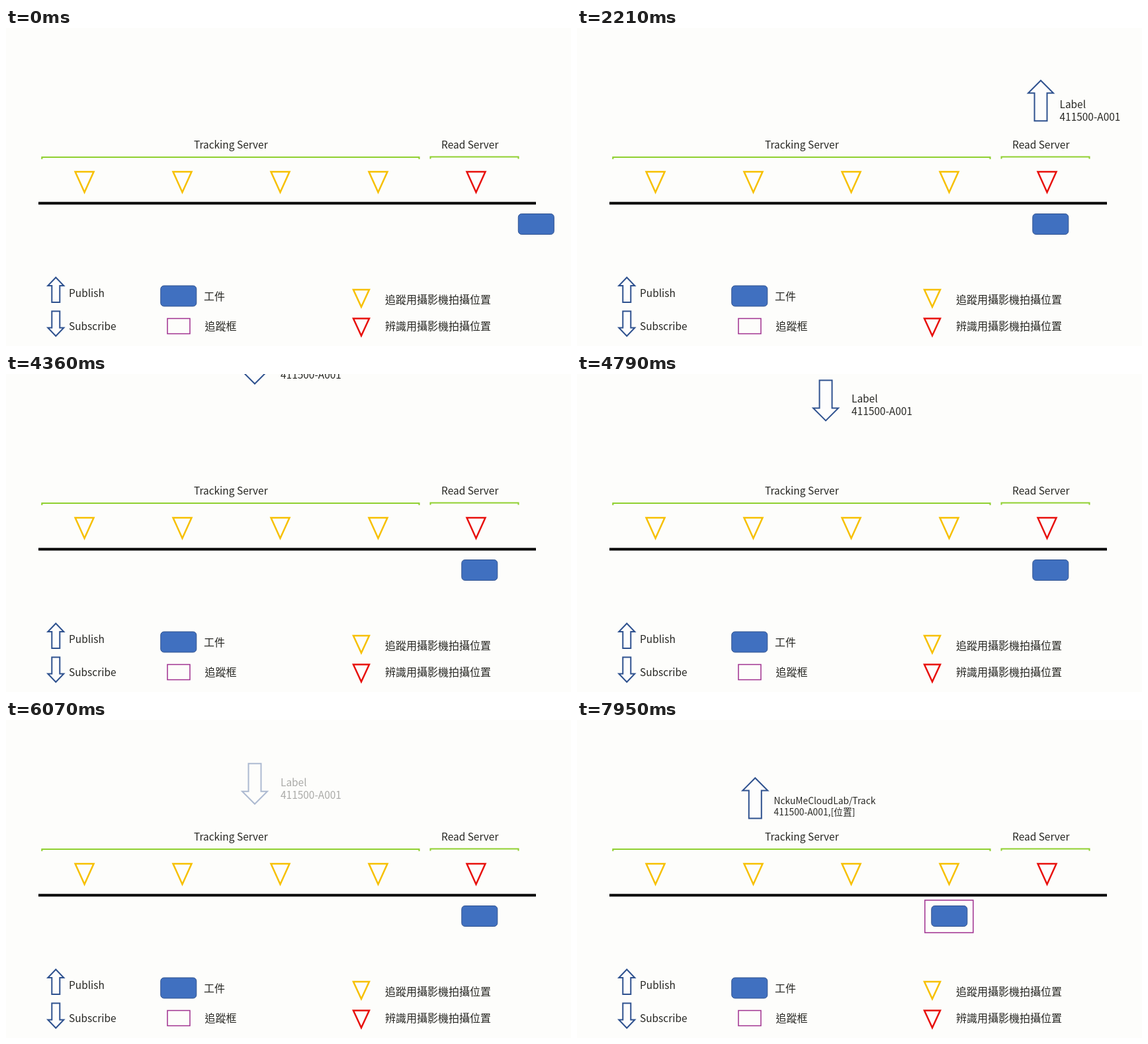
These frames come from a looping animation (854 by 480 pixels, 7990 ms). An HTML page:

```html
<!DOCTYPE html>
<html lang="zh-Hant">
<head>
<meta charset="utf-8">
<title>Tracking Server</title>
<style>
html, body { margin: 0; width: 100%; height: 100%; overflow: hidden; background: #fdfdfb; }
svg { display: block; width: 854px; height: 480px; }
text { font-family: "Noto Sans CJK TC", "Noto Sans CJK", "Noto Sans CJK JP", "Noto Sans", sans-serif; font-size: 15.45px; fill: #262622; }
.cjk { font-size: 16px; }
.small { font-size: 13.8px; }
.arrow { fill: #fdfdfd; stroke: #2f528f; stroke-width: 2; }
.camera { fill: #fdfdfd; stroke: #f7c000; stroke-width: 2.5; }
.reader { stroke: #e8100c; }
.bracket { fill: none; stroke: #8fd030; stroke-width: 2; }
.part { fill: #4070c0; stroke: #2f528f; stroke-width: 1; }
.box { fill: none; stroke: #a03090; stroke-width: 1.5; }
</style>
</head>
<body>
<svg id="stage" viewBox="0 0 854 480" xmlns="http://www.w3.org/2000/svg"></svg>
<script>
const LOOP = 7990;
const stage = document.getElementById('stage');

const label = (x, y, s, cls = '') => `<text x="${x}" y="${y}" class="${cls}">${s}</text>`;

const camera = (x, y, half, h, cls = '') =>
  `<path class="camera ${cls}" d="M${x - half} ${y}h${2 * half}l${-half} ${h}z"/>`;

// Block arrow; dir 1 points down from its flat end at y, -1 points up.
const arrow = (x, y, dir, half, shaft, body, head) => {
  const wing = half - shaft;
  return `<path class="arrow" d="M${x - shaft} ${y}h${2 * shaft}v${dir * body}h${wing}` +
    `l${-half} ${dir * head}l${-half} ${-dir * head}h${wing}z"/>`;
};
const bigArrow = (x, y, dir) => arrow(x, y, dir, 19, 9.5, 42, 19);
const keyArrow = (y, dir) => arrow(75.3, y, dir, 12, 6, 25, 12.5);

const part = (x, y) => `<rect class="part" x="${x}" y="${y}" width="54" height="31" rx="5"/>`;
const code = '411500-A001';

stage.innerHTML =
  label(284, 182, 'Tracking Server') + label(658, 182, 'Read Server') +
  '<path class="bracket" d="M54.3 198v-3H624.5v3M641.5 197.5v-3H774.5v3"/>' +
  [118.6, 266.5, 414.5, 562.5].map(x => camera(x, 217, 14, 31)).join('') +
  camera(710.5, 217, 14, 31, 'reader') +
  '<path d="M49 264.5H801" stroke="#000" stroke-width="4"/>' +
  keyArrow(414, -1) + label(95, 406, 'Publish') +
  keyArrow(427.5, 1) + label(95, 456, 'Subscribe') +
  part(233.8, 389) + label(299, 411, '工件', 'cjk') +
  '<rect class="box" x="244" y="438.5" width="34" height="23"/>' +
  label(300.5, 456, '追蹤框', 'cjk') +
  camera(537, 395, 12, 26) + label(573, 416, '追蹤用攝影機拍攝位置', 'cjk') +
  camera(537, 438.5, 12, 26, 'reader') + label(573, 456, '辨識用攝影機拍攝位置', 'cjk') +
  `<g id="item">${part(0, 280.5)}<rect id="box" class="box" x="-10" y="272" width="73" height="49"/></g>` +
  `<g id="read">${bigArrow(701, 148.5, -1)}${label(729.5, 129, 'Label')}${label(729.5, 148, code)}</g>` +
  `<g id="sub">${bigArrow(376, 84, 1)}${label(415, 118, 'Label')}${label(415, 137, code)}</g>` +
  `<g id="track">${bigArrow(269.3, 148.5, -1)}${label(297.5, 126.5, 'NckuMeCloudLab/Track', 'small')}` +
  `${label(297.5, 143.5, code + ',[位置]', 'small')}</g>`;

const [item, box, read, sub, track] =
  ['item', 'box', 'read', 'sub', 'track'].map(id => document.getElementById(id));

const ramp = (t, start, span) => Math.min(1, Math.max(0, (t - start) / span));
const ease = (t, start, span) => {
  const u = ramp(t, start, span);
  return u < 0.5 ? 2 * u * u : 1 - 2 * (1 - u) ** 2;
};
const place = (el, x, y, alpha = 1) => {
  el.setAttribute('transform', `translate(${x.toFixed(2)} ${y.toFixed(2)})`);
  el.setAttribute('opacity', alpha.toFixed(3));
};

function draw(t) {
  place(item, 774.3 - 85.5 * ease(t, 726, 420) - 153 * ease(t, 6590, 750), 0);
  box.setAttribute('opacity', ramp(t, 6350, 200));

  place(read, 0, -152 * ease(t, 1940, 1640), ramp(t, 1640, 260));

  const leave = ramp(t, 5640, 700);
  place(sub, 0, -146 * (1 - ease(t, 3980, 1640)) - 48 * leave * leave,
    t < 3950 ? 0 : 1 - leave);

  place(track, 0, 0, ramp(t, 7450, 350));
}

const begin = performance.now();
function tick() {
  draw((performance.now() - begin) % LOOP);
  requestAnimationFrame(tick);
}
tick();
</script>
</body>
</html>
```
